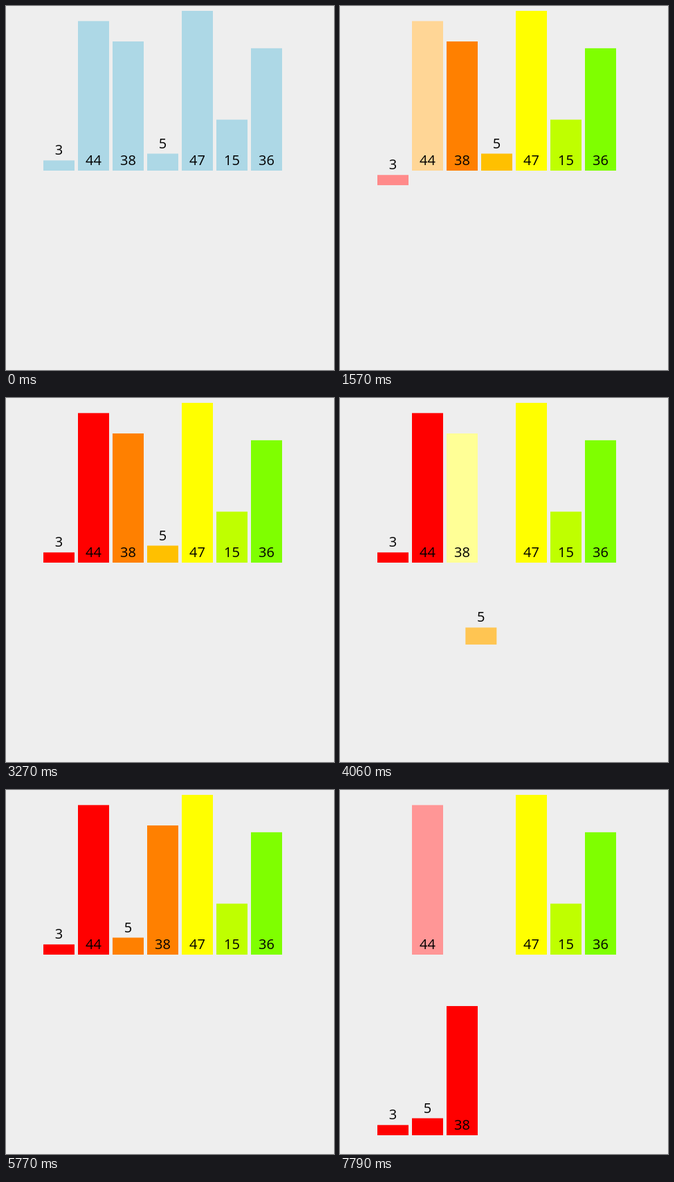
These frames come from a looping animation (474x524 px, 8000 ms). An HTML page:

```html
<!DOCTYPE html>
<html lang="en">
<head>
<meta charset="utf-8">
<title>Merge sort bars</title>
<style>
  html, body { margin: 0; width: 100%; height: 100%; overflow: hidden; background: #eee; }
  svg { display: block; width: 474px; height: 524px; }
  text { font: 20px "Open Sans", "Noto Sans", sans-serif; text-anchor: middle; }
</style>
</head>
<body>
<svg viewBox="0 0 474 524"><g id="bars"></g><g id="labels"></g></svg>
<script>
const LOOP = 8000, MOVE = 250, WIDTH = 45, GAP = 50, LEFT = 54, FLOOR = 237, DROP = 260;
const values = [3, 44, 38, 5, 47, 15, 36];
const LIGHT_BLUE = [173, 216, 230];

const clamp = v => Math.max(0, Math.min(255, v));
const hue = i => [clamp(255 - 64 * (i - 4)), clamp(64 * i), 0];
const glow = i => hue(i).map(v => clamp(v + 150));

// [start, bar, colour, slot, low]; omitted slot and low keep their value
const steps = [
  ...values.map((_, i) => [485, i, hue(i)]),
  [1000, 0, glow(0)], [1000, 1, glow(1)],
  [1503, 0, hue(0), 0, 1],
  [1980, 1, hue(0), 1, 1],
  [2435, 0, hue(0), 0, 0],
  [2975, 1, hue(0), 1, 0],
  [3460, 2, glow(2)], [3460, 3, glow(3)],
  [3940, 3, hue(2), 2, 1],
  [4459, 2, hue(2), 3, 1],
  [4915, 3, hue(2), 2, 0],
  [5475, 2, hue(2), 3, 0],
  [5915, 0, glow(0)], [5915, 3, glow(2)],
  [6495, 0, hue(0), 0, 1], [6495, 1, glow(0)],
  [6972, 3, hue(0), 1, 1], [6972, 2, glow(2)],
  [7495, 2, hue(0), 2, 1],
];

function add(parent, tag) {
  const el = document.createElementNS("http://www.w3.org/2000/svg", tag);
  return document.getElementById(parent).appendChild(el);
}

const items = values.map(value => {
  const height = value * 230 / 47;
  const bar = add("bars", "rect"), label = add("labels", "text");
  bar.setAttribute("width", WIDTH);
  bar.setAttribute("height", height);
  label.textContent = value;
  return { height, bar, label, rise: height < 30 ? height + 8 : 8 };
});

const mix = (a, b, k) => a + (b - a) * k;
const ease = t => t < 0.5 ? 4 * t ** 3 : 1 - 4 * (1 - t) ** 3;

function draw(time) {
  const states = values.map((_, slot) => ({ colour: LIGHT_BLUE, slot, low: 0 }));
  for (const [start, i, colour, slot, low] of steps) {
    if (time <= start) break;
    const s = states[i], k = ease(Math.min(1, (time - start) / MOVE));
    s.colour = s.colour.map((v, c) => mix(v, colour[c], k));
    s.slot = mix(s.slot, slot ?? s.slot, k);
    s.low = mix(s.low, low ?? s.low, k);
  }
  items.forEach(({ height, bar, label, rise }, i) => {
    const { colour, slot, low } = states[i];
    const x = LEFT + GAP * slot, bottom = FLOOR + DROP * low;
    bar.setAttribute("x", x);
    bar.setAttribute("y", bottom - height);
    bar.setAttribute("fill", `rgb(${colour.map(Math.round)})`);
    label.setAttribute("x", x + WIDTH / 2);
    label.setAttribute("y", bottom - rise);
  });
}

const origin = performance.now();
function tick() {
  draw((performance.now() - origin) % LOOP);
  requestAnimationFrame(tick);
}
tick();
</script>
</body>
</html>
```
